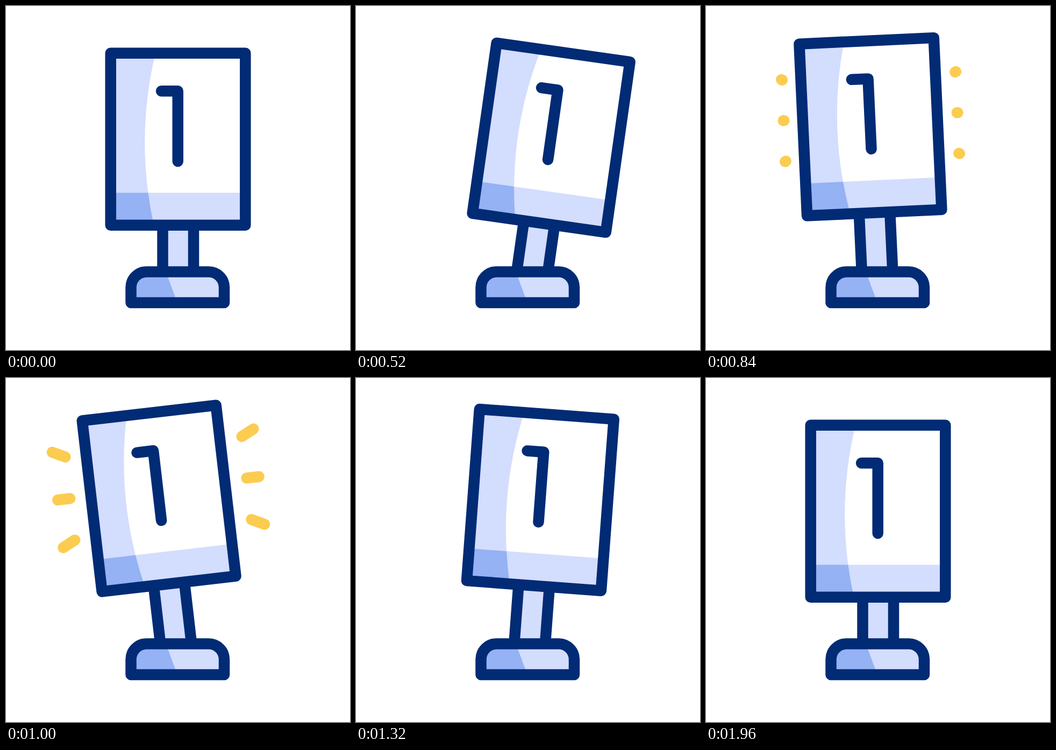
Animation, 640 px wide and 640 px high, one loop 2200 ms. Source, as an HTML page:

```html
<!DOCTYPE html>
<html lang="en">
<head>
<meta charset="utf-8">
<title>Table number</title>
<style>
  html, body { margin: 0; height: 100%; overflow: hidden; background: #fff; }
  svg { display: block; width: 100%; height: 100%; }
  .line { fill: none; stroke: #022b75; stroke-width: 20.5; stroke-linecap: round; stroke-linejoin: round; }
  .light { fill: #d3ddfd; }
  .mid { fill: #94b2f4; }
  #rays { fill: none; stroke: #fbcc50; stroke-width: 20.5; stroke-linecap: round; }
</style>
</head>
<body>
<svg viewBox="0 0 640 640">
  <defs>
    <path id="base" d="M232.5 552V523.5a29 29 0 0 1 29-29H377a29 29 0 0 1 29 29V552Z"/>
    <rect id="card" x="194.7" y="87.7" width="250.6" height="320"/>
    <clipPath id="strip"><rect x="195" y="347.5" width="250" height="60"/></clipPath>
    <path id="shade" d="M195 88H278Q240 247 275 408H195Z"/>
  </defs>
  <g id="sign">
    <path id="rays"/>
    <rect class="light" x="291.5" y="408" width="57.5" height="122"/>
    <path class="line" d="M291.5 407.5V530M349 407.5V530"/>
    <use href="#card" fill="#fff"/>
    <use href="#shade" class="light"/>
    <use href="#card" class="light" clip-path="url(#strip)"/>
    <use href="#shade" class="mid" clip-path="url(#strip)"/>
    <use href="#card" class="line"/>
    <path class="line" d="M289 158.3H319.7V289"/>
  </g>
  <use href="#base" class="light"/>
  <path class="mid" d="M232.5 552V523.5a29 29 0 0 1 29-29H297.5L318.7 552Z"/>
  <use href="#base" class="line"/>
</svg>
<script>
const LOOP = 2200, STEP = 40, RAY = 78;
const sign = document.getElementById('sign');
const rays = document.getElementById('rays');

// Eased progress from 0 to 1 between two times.
function ease(t, from, to) {
  const s = Math.min(1, Math.max(0, (t - from) / (to - from)));
  return s * s * (3 - 2 * s);
}

// A decaying swing: each turning point is [time, angle].
const turns = [[200, 0], [645, 10], [948, -7.8], [1225, 5], [1700, -2.05], [1900, 0]];
const tilt = t => turns.slice(1).reduce((angle, [time, next], i) =>
  angle + (next - turns[i][1]) * ease(t, turns[i][0], time), 0);

const lift = t => 25.7 * (ease(t, 325, 960) - ease(t, 1136, 1871));

function rayPath(tail, head) {
  if (head <= tail) return '';
  let d = '';
  for (const side of [-1, 1]) {
    for (const row of [-1, 0, 1]) {
      const point = p => `${321 + side * (161 + p)} ${228.8 + row * (75.6 + p / 2)}`;
      d += `M${point(tail)}L${point(head)}`;
    }
  }
  return d;
}

function draw(now) {
  const t = Math.floor(now % LOOP / STEP) * STEP;
  sign.setAttribute('transform', `translate(0 ${-lift(t)}) rotate(${tilt(t)} 320 555)`);
  rays.setAttribute('d', rayPath(RAY * ease(t, 950, 1300), RAY * ease(t, 800, 1300)));
}

const start = performance.now();
function tick() {
  draw(performance.now() - start);
  requestAnimationFrame(tick);
}
tick();
</script>
</body>
</html>
```
